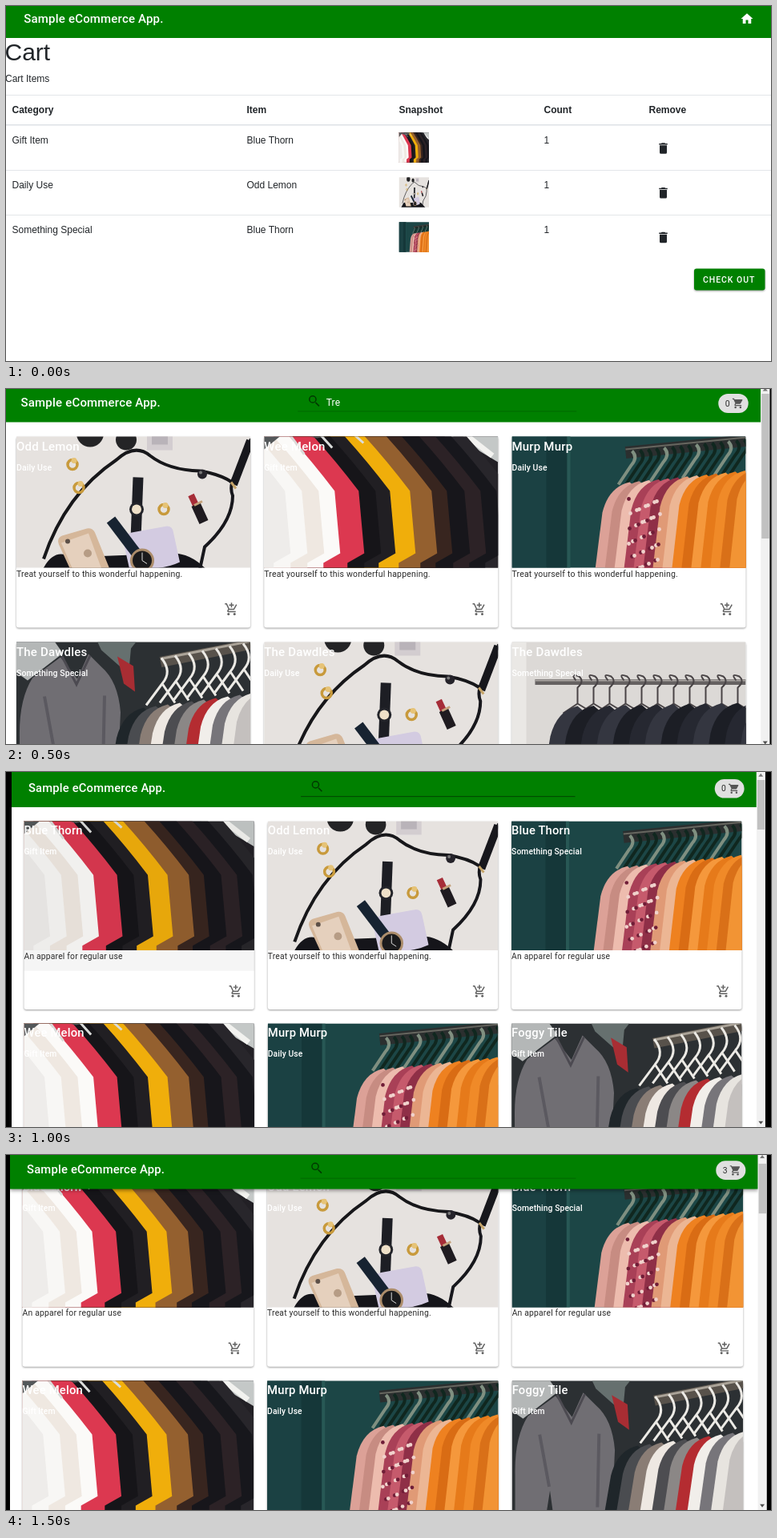
Recreate the animation shown at these times as an HTML page. Size 955 by 444 pixels, loop 2000 ms.

```html
<!DOCTYPE html>
<html lang="en">
<head>
<meta charset="utf-8">
<title>Sample eCommerce App</title>
<style>
html, body { margin: 0; width: 100%; height: 100%; overflow: hidden; background: #fff }
#stage { display: block; width: 955px; height: 444px }
text { white-space: pre }
.title { font: 500 15px Roboto, sans-serif; letter-spacing: .0125em; fill: #fff }
.sub { font: 500 10.5px Roboto, sans-serif; letter-spacing: .0071em; fill: #fff }
.body { font: 10.5px Roboto, sans-serif; letter-spacing: .0178em; fill: #2b2b2b }
.field { font: 12px Roboto, sans-serif; letter-spacing: .009em; fill: #fff }
.button { font: 500 10.5px Roboto, sans-serif; letter-spacing: .0893em; fill: #fff }
.cell { font: 12px "Liberation Sans", Arial, sans-serif; fill: #212529 }
.head { font: bold 12px "Liberation Sans", Arial, sans-serif; fill: #212529 }
.h1 { font: 30px "Liberation Sans", Arial, sans-serif; fill: #212529 }
.raised { filter: drop-shadow(0 1px 1px #0006) }
</style>
</head>
<body>
<svg id="stage" viewBox="0 0 955 444"></svg>
<script>
const GREEN = '#008000';
const rect = (x, y, w, h, fill, extra = '') => `<rect x="${x}" y="${y}" width="${w}" height="${h}" fill="${fill}" ${extra}/>`;
const shape = (d, fill) => `<path d="${d}" fill="${fill}"/>`;
const line = (d, color, w) => `<path d="${d}" fill="none" stroke="${color}" stroke-width="${w}"/>`;
const dot = (x, y, r, fill) => `<circle cx="${x}" cy="${y}" r="${r}" fill="${fill}"/>`;
const label = (cls, x, y, s) => `<text class="${cls}" x="${x}" y="${y}">${s}</text>`;
const icon = (art, x, y, color, size = 18) =>
  `<g transform="translate(${x} ${y}) scale(${size / 24})" fill="${color}" stroke="none">${art}</g>`;
const repeat = (n, draw) => Array.from({ length: n }, (_, i) => draw(i)).join('');

// 24-unit icons
const wheels = '<circle cx="7" cy="20" r="2"/><circle cx="17" cy="20" r="2"/>';
const icons = {
  home: '<path d="M10 20v-6h4v6h5v-8h3L12 3 2 12h3v8z"/>',
  trash: '<path d="M6 19q0 2 2 2h8q2 0 2-2V7H6zM19 4h-3.5l-1-1h-5l-1 1H5v2h14z"/>',
  search: '<path d="M15 14l6 6-1.5 1.5-6-6z"/><circle cx="9.5" cy="9.5" r="5.5" fill="none" stroke="#003800" stroke-width="2"/>',
  cart: wheels + '<path d="M1 2h3.3l1 2H20q1.5 0 .9 1.5l-3.6 6.5q-.6 1-1.8 1H8.1l-1 2H19v2H7q-3 0-1.7-3l1.3-2.4L3 4H1z"/>',
  addCart: wheels + '<path d="M11 9h2V6h3V4h-3V1h-2v3H8v2h3z"/>' +
    '<path d="M1 3h2.7l4.2 9h8l4.4-7.8M7.3 12l-1.2 2.2q-.8 1.8 1 1.8H19" fill="none" stroke="#616161" stroke-width="2"/>'
};

// Photos, drawn on a 292 x 164 field with a margin above and below
const backdrop = fill => rect(0, -20, 292, 210, fill);
const ring = (x, y) => `<circle cx="${x}" cy="${y}" r="6" fill="none" stroke="#c89a3c" stroke-width="3.5"/>` + dot(x + 2, y - 5, 3.5, '#e6c377');
const accessories = backdrop('#e6e2df') +
  dot(92, -4, 17, '#242426') + dot(137, 4, 13, '#242426') + rect(163, -12, 32, 29, '#d3cdd0') + rect(169, -5, 20, 15, '#b9b3b9') +
  shape('M34 164Q48 139 68 151L196 146Q216 146 235 164L270 190H15z', '#15151a') +
  line('M34 153Q61 72 125 29Q148 8 167 24Q190 42 229 43Q254 47 269 57', '#17171a', 4) +
  line('M293 3L274 48Q265 61 270 74Q270 106 235 138L229 166', '#17171c', 4) +
  line('M292 5L271 60', '#17171c', 10) + line('M268 57l6 8', '#c5a468', 3) +
  ring(70, 35) + ring(78, 64) + ring(184, 91) + dot(232, 47, 6, '#25232a') + dot(230, 45, 2, '#777') +
  line('M218 73l6 13', '#a62d38', 8) + line('M224 85l10 22', '#1f1b20', 12) + line('M222 86l10-5', '#c5a27b', 3) +
  line('M152 51L149 128', '#1d1e24', 13) + dot(150, 91, 9, '#23242a') + dot(150, 91, 6, '#eee0c8') +
  shape('M133 129Q134 122 144 120L188 112Q195 112 196 120L204 157Q181 168 141 165z', '#d3cbe1') +
  shape('M53 135Q50 127 57 124L88 115Q95 114 98 120L119 172H70z', '#d5b79a') + shape('M56 133L90 121 108 170H72z', '#e5d0bd') +
  dot(89, 146, 5, '#b69c85') + dot(64, 131, 3, '#5d5048') +
  line('M118 104L149 145', '#172331', 13) + dot(157, 155, 15, '#ac8d6b') + dot(157, 155, 12, '#1a1a1c') +
  line('M157 145v10l6 4', '#ddd', 1);

const sleeve = (x, fill) => shape(`M-5-20H${x - 75}Q${x - 38} 18 ${x} 68L${x + 7} 146L${x - 14} 158V200H-5z`, fill);
const shirts = backdrop('#222025') + shape('M190-20H292V32L262 14z', '#c4c8c7') +
  line('M225-5L264 28M248-5L285 24', '#f2f2ef', 7) +
  [[309, '#28262b'], [290, '#17171c'], [270, '#2c2226'], [250, '#17161b'], [228, '#38251f'], [209, '#94602f'],
    [182, '#f0ae0b'], [157, '#211f23'], [139, '#161519'], [118, '#dc3850'], [88, '#fbfaf8'], [68, '#efe8e1'],
    [47, '#f8f7f5'], [26, '#eeecea']].map(([x, fill]) => sleeve(x, fill)).join('') +
  shape('M0-20H110L100-4 66 2 28-7 0 16z', '#54585a') +
  line('M30-5L50 22M65-8L85 14M104-10L124 8', '#dadcda', 3);

// A garment on a hanger, its left sleeve at x
const drape = (x, top, fill) =>
  shape(`M${x + 34} ${top}Q${x + 8} ${top + 6} ${x} ${top + 38}L${x - 12} 190H${x + 74}V${top + 34}z`, fill);
const drapes = (x, step, top, rise, fills) => fills.map((fill, i) => drape(x + i * step, top - i * rise, fill)).join('');

const boutique = backdrop('#1c4646') + rect(0, -20, 43, 210, '#1b4143') + rect(43, -20, 26, 210, '#153739') +
  rect(69, -20, 4, 210, '#285855') + line('M142 20L292 5', '#2b2f2f', 15) + line('M142 16L292 1', '#66665f', 2) +
  repeat(15, i => line(`M${150 + i * 10} ${18 - i}q8 8-1 18l-16 24`, i % 4 ? '#10271f' : '#7f8f80', 4)) +
  drapes(113, 12, 57, 1.2, ['#dca197', '#c78c82', '#edbcae', '#a94057', '#c65a6c', '#8f2f47', '#e09a76',
    '#ecb694', '#ee8120', '#d96c14', '#f5983c', '#e67a1a', '#f08a28', '#d97018', '#f29434']) +
  repeat(42, i => dot(146 + i * 17 % 40, 78 + i * 29 % 92, 2.4, i % 3 ? '#f0d2cc' : '#701d37'));

const sweaters = backdrop('#2c3033') + shape('M0-20H34L58 14 14 48 0 38z', '#b4b7b7') +
  shape('M92-20L106 10 140 40 143 8 165-20z', '#66706f') + shape('M126 18L146 30 148 62 134 52z', '#a82d33') +
  shape('M55 19L20 45Q3 72 4 119V190H40L48 139 55 190H125L130 88Q127 49 106 31L90 15 76 46z', '#706e73') +
  line('M57 18L75 53 92 17', '#4c4a51', 3) + line('M35 68L47 134M110 67L108 160', '#5b5960', 4) +
  line('M180 25L292 3', '#58524b', 13) + line('M180 21L292-1', '#aaa398', 3) +
  drapes(125, 15, 82, 2, ['#1f262a', '#4a4c50', '#8a7d75', '#eee8e2', '#4d4d51', '#8b8786', '#b42c31', '#f1eeea', '#77757a', '#e7e4df', '#c4c0be']) +
  repeat(7, i => line(`M${181 + i * 17} ${20 - i * 3}q14 17 1 32l-20 27m20-27l16 24`, '#eceae5', 3));

const jackets = backdrop('#dcd9d6') + rect(0, -20, 18, 210, '#eae8e5') +
  line('M29 50H292', '#656161', 7) + line('M29 48H292', '#aaa5a2', 2) +
  repeat(12, i => line(`M${80 + i * 20} 48q-8-10 4-5 7 6-2 14v20l-18 12m18-12l20 12`, '#484345', 2)) +
  drapes(48, 20, 80, .4, Array.from({ length: 13 }, (_, i) => ['#343640', '#1c1e25', '#262831'][i % 3]));

const art = { accessories, shirts, boutique, sweaters, jackets };
const photo = (name, x, y, w, h, top = 0, height = 164) =>
  `<svg x="${x}" y="${y}" width="${w}" height="${h}" viewBox="0 ${top} 292 ${height}" preserveAspectRatio="none"><use href="#${name}"/></svg>`;

function cartPage() {
  const rows = [['Gift Item', 'Blue Thorn', 'shirts'], ['Daily Use', 'Odd Lemon', 'accessories'], ['Something Special', 'Blue Thorn', 'boutique']];
  const columns = [['Category', 7.5], ['Item', 300.5], ['Snapshot', 490.5], ['Count', 671.5], ['Remove', 802.5]];
  return rect(0, 0, 955, 444, '#fff') + rect(0, 0, 955, 40, GREEN) +
    label('title', 22.3, 21, 'Sample eCommerce App.') + icon(icons.home, 916, 7, '#fff') +
    label('h1', -1.5, 68, 'Cart') + label('cell', -1, 94.5, 'Cart Items') +
    rect(0, 111, 955, 1, '#e3e6e9') + rect(0, 148, 955, 1.5, '#dee2e6') + rect(0, 205, 955, 1, '#e3e6e9') + rect(0, 261, 955, 1, '#e3e6e9') +
    columns.map(([s, x]) => label('head', x, 134, s)).join('') +
    rows.map(([category, item, name], i) => {
      const y = 171.5 + i * 56;
      return label('cell', 7.5, y, category) + label('cell', 300.5, y, item) + label('cell', 671.5, y, '1') +
        photo(name, 490.5, 158.3 + i * 56, 37.5, 37.5, -15, 194) + icon(icons.trash, 811.5, 169 + i * 55.8, '#212529');
    }).join('') +
    rect(859, 328.5, 88.5, 27, GREEN, 'rx="3" class="raised"') + label('button', 870, 346, 'CHECK OUT');
}

const treat = 'Treat yourself to this wonderful happening.', apparel = 'An apparel for regular use';

function card([name, title, sub, text], i, scroll, hover) {
  const x = 15.75 + i % 3 * 309.25, y = 66 + Math.floor(i / 3) * 257 - scroll;
  return rect(x, y, 292, 239, '#fff', 'rx="3" class="raised"') + photo(name, x, y, 292, 164) +
    (hover ? rect(x, y, 292, 190, '#000', 'opacity=".04"') : '') +
    label('title', x, y + 17, title) + label('sub', x, y + 42.3, sub) +
    label('body', x, y + 175, text) + icon(icons.addCart, x + 259.5, y + 207, '#616161');
}

function shopPage({ x, y, scale, cards, count, query = '', scroll = 0, hover = -1, thumb, underline }) {
  return rect(0, 0, 955, 444, '#000') + `<g transform="translate(${x} ${y}) scale(${scale})">` +
    rect(0, 0, 956, 480, '#fff') +
    cards.map((c, i) => card(c, i, scroll, i === hover)).join('') +
    rect(0, 0, 945, 48, GREEN, scroll ? 'style="filter:drop-shadow(0 2px 2px #0006)"' : '') +
    label('title', 21.3, 28.5, 'Sample eCommerce App.') +
    icon(icons.search, 378.5, 12.3, '#003800') + rect(367, 34, 348, .9, underline) + label('field', 402.5, 27, query) +
    rect(892, 12.4, 37.5, 24, '#e0e0e0', 'rx="12"') + label('body', 900.5, 28, count) + icon(icons.cart, 909, 17, '#555', 15) +
    rect(945, 0, 11, 480, '#f1f1f1') + rect(946, thumb[0], 9.5, thumb[1] - thumb[0], '#c1c1c1') +
    shape('M947.5 9l3-4 3 4z', '#777') + shape('M947.5 447l3 4 3-4z', '#505050') + '</g>';
}

const searchCards = [
  ['accessories', 'Odd Lemon', 'Daily Use', treat], ['shirts', 'Wee Melon', 'Gift Item', treat], ['boutique', 'Murp Murp', 'Daily Use', treat],
  ['sweaters', 'The Dawdles', 'Something Special', treat], ['accessories', 'The Dawdles', 'Daily Use', treat], ['jackets', 'The Dawdles', 'Something Special', treat]];
const allCards = [
  ['shirts', 'Blue Thorn', 'Gift Item', apparel], ['accessories', 'Odd Lemon', 'Daily Use', treat], ['boutique', 'Blue Thorn', 'Something Special', apparel],
  ['shirts', 'Wee Melon', 'Gift Item', apparel], ['boutique', 'Murp Murp', 'Daily Use', treat], ['sweaters', 'Foggy Tile', 'Gift Item', apparel]];

const pages = [
  cartPage(),
  shopPage({ x: -2.75, y: -6.5, scale: 1, cards: searchCards, count: 0, query: 'Tre', thumb: [12.5, 193.5], underline: '#006500' }),
  shopPage({ x: 7, y: -3.2, scale: .984, cards: allCards, count: 0, hover: 0, thumb: [13.4, 76.4], underline: '#003c00' }),
  shopPage({ x: 5, y: -4.9, scale: .988, cards: allCards, count: 3, scroll: 32.2, thumb: [16, 79], underline: '#006500' })
];

const stage = document.getElementById('stage');
stage.innerHTML = '<defs>' + Object.entries(art).map(([id, s]) => `<g id="${id}">${s}</g>`).join('') + '</defs>' +
  pages.map(p => `<g class="page">${p}</g>`).join('');
const groups = [...stage.querySelectorAll('.page')];

const start = performance.now();
function tick() {
  const current = Math.floor((performance.now() - start) / 500) % pages.length;
  groups.forEach((g, i) => { g.style.display = i === current ? '' : 'none'; });
  requestAnimationFrame(tick);
}
tick();
</script>
</body>
</html>
```
